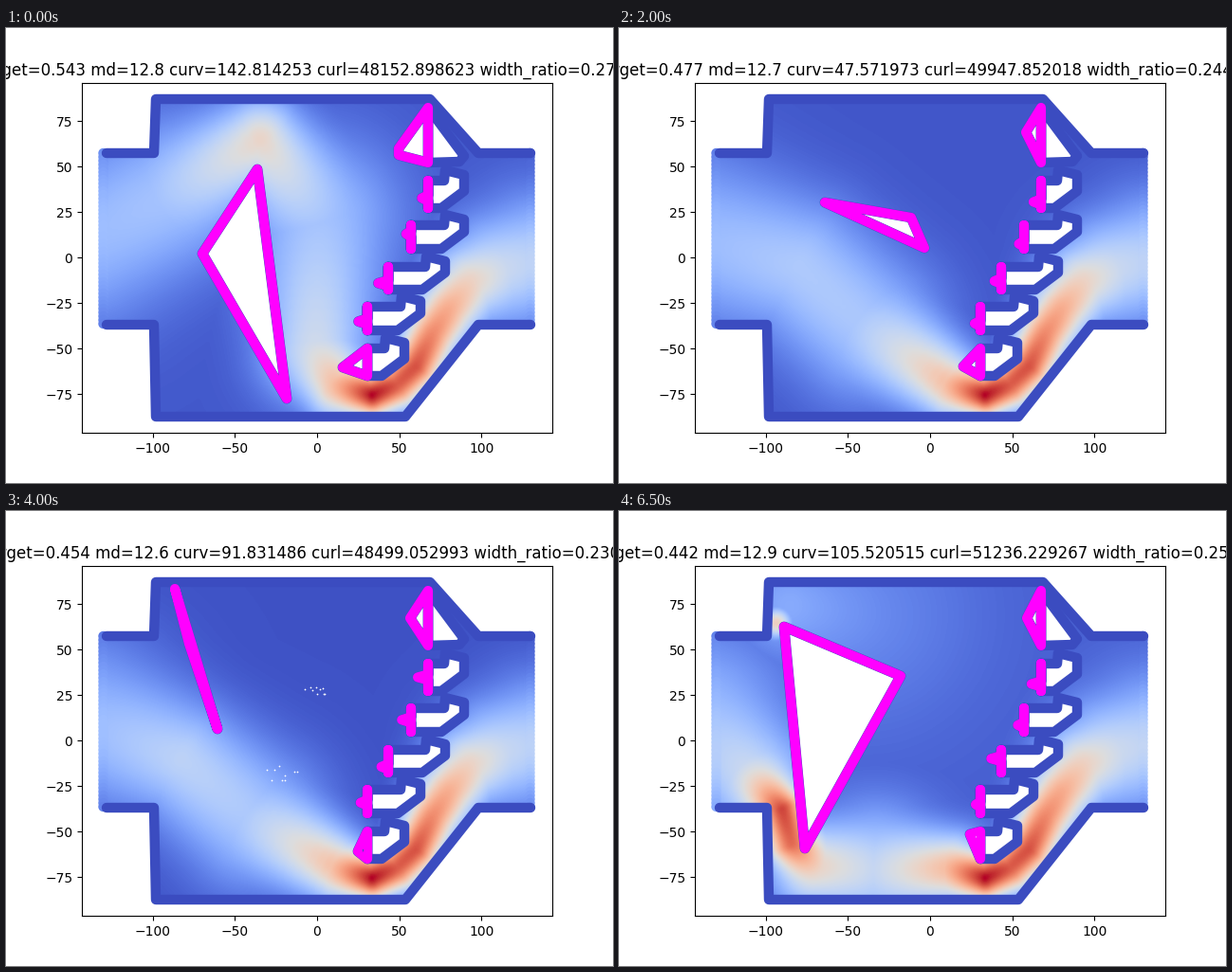
A matplotlib script that plays this animation: 640 px wide and 480 px high, repeating every 7000 ms.

```python
import numpy as np
import matplotlib.pyplot as plt
from matplotlib.animation import FuncAnimation
from matplotlib.collections import LineCollection, PolyCollection
from matplotlib.patches import Polygon

plt.rcParams["text.kerning_factor"] = 6

W, H = 640, 480
STEPS = 14
DARK = plt.get_cmap("coolwarm")(0.0)
PINK = "#ff00ff"
DOT = 7.5  # stroke width of every outline, in points

# Shapes are laid out in stage pixels.
TOP_WALL = [(106, 132), (156, 132), (158, 75), (447, 75), (498, 132), (553, 132)]
LOW_WALL = [(106, 313), (156, 313), (158, 410), (421, 410), (498, 313), (553, 313)]
DOMAIN = [(102, 132), *TOP_WALL[1:], *LOW_WALL[:0:-1], (102, 313)]

# upright side of each tip (x, top, bottom) and right end of the vane behind it
BARS = [(445, 84, 142), (445, 161, 190), (427, 208, 233),
        (403, 252, 276), (381, 294, 319), (381, 338, 367)]
REACH = [483, 483, 483, 463, 437, 420]

# route points: x, y, speed
INLET = (85, 222, .27)
JET = [(350, 377, .65), (386, 387, 1), (412, 376, .88), (432, 357, .9), (450, 322, .78),
       (467, 296, .69), (490, 268, .55), (520, 255, .42), (560, 245, .36)]


def scene(body, head, foot, via, floor=.015, extra=(), gaps=()):
    """Large body, apexes of the first and last tip, and the way the flow takes."""
    return dict(body=body, head=head, foot=foot, floor=floor, gaps=gaps,
                flow=[(24, [INLET, *via, *JET]), *extra])


def split(head, foot):
    return scene([(174, 122), (297, 174), (196, 356)], head, foot,
                 [(140, 280, .42), (172, 315, .92), (182, 350, .85),
                  (205, 374, .55), (270, 378, .37)], .045,
                 extra=[(9, [(166, 118, .56)]), (12, [(180, 100, .2), (260, 110, .1)])])


SCENES = [
    scene([(265, 149), (207, 238), (296, 391)], [(414, 127), (414, 134)], (355, 358),
          [(170, 178, .3), (268, 118, .54), (330, 200, .29), (326, 340, .44)], .03),
    scene([(169, 107), (219, 186), (223, 252), (186, 246)], [(421, 108), (431, 140)],
          (363, 357), [(168, 282, .55), (220, 320, .36), (280, 350, .34)],
          gaps=[(312, 180)]),
    split([(430, 104), (415, 91), (417, 123)], (353, 351)),
    scene([(217, 184), (308, 200), (322, 232)], [(429, 110)], (363, 357),
          [(190, 252, .33), (260, 315, .32)], .025),
    scene([(178, 82), (193, 140), (223, 230)], [(426, 113)], (371, 359),
          [(185, 262, .38), (260, 325, .33)], gaps=[(328, 187), (295, 278)]),
    scene([(305, 119), (376, 140), (321, 221)], [(423, 92), (428, 103)], (364, 347),
          [(175, 235, .28), (245, 290, .27)], gaps=[(187, 226), (250, 302)]),
    split([(430, 113)], (370, 341)),
]

# step at which each scene is reached, and the readings there
KEYS = [0, 1, 3, 6, 8, 10, 13]
READINGS = np.array([
    (.543, 12.8, 142.814253, 48152.898623, .270913),
    (.5, 12.1, 192.371622, 48401.395132, .229418),
    (.481, 12.7, 56.505071, 50668.005549, .251360),
    (.469, 12.7, 29.705778, 48507.544956, .229541),
    (.454, 12.6, 91.831486, 48499.052993, .230625),
    (.453, 12.3, 46.411843, 48539.258104, .224739),
    (.442, 12.9, 105.520515, 51236.229267, .252871),
])

GX, GY = np.meshgrid(np.arange(97, 559, 2.0), np.arange(69, 417, 2.0))


def flow_field(s):
    """Strongest of many soft spots along each route; slow flow spreads wide."""
    out = np.zeros_like(GX)
    for gauge, route in s["flow"]:
        pts = np.array(route, float)
        t = np.linspace(0, len(pts) - 1, 12 * (len(pts) - 1) + 1)
        for x, y, v in zip(*(np.interp(t, np.arange(len(pts)), c) for c in pts.T)):
            d2 = (GX - x) ** 2 + (GY - y) ** 2
            np.maximum(out, v * np.exp(-d2 * (v / gauge) ** 2), out=out)
    return s["floor"] + (1 - s["floor"]) * out


def vane(bar, end):
    x, top, low = bar
    return [(x, low), (end - 24, low), (end, low - 18), (end, top - 6),
            (end - 20, top - 11), (end - 21, top), (x, top)]


def tip(bar, apexes):
    return [(bar[0], bar[1]), *apexes, (bar[0], bar[2])]


def nub(bar, rng):
    """Upright bar with a short spike at a random height."""
    x, top, low = bar
    y = top + (low - top) * rng.uniform(.35, .8)
    return tip(bar, [(x, y - 3), (x - rng.uniform(5, 11), y), (x, y + 3)])


def tips(s, rng):
    return [tip(BARS[0], s["head"]), *(nub(b, rng) for b in BARS[1:-1]),
            tip(BARS[-1], [s["foot"]])]


def heading(i):
    target, md, curv, curl, ratio = (np.interp(i, KEYS, c) for c in READINGS.T)
    return (f"target={float(round(target, 3))} md={md:.1f} curv={curv:.6f} "
            f"curl={curl:.6f} width_ratio={ratio:.6f}")


FIELDS = [flow_field(s) for s in SCENES]

fig = plt.figure(figsize=(W / 100, H / 100), dpi=100, facecolor="white")
stage = fig.add_axes([0, 0, 1, 1])
stage.axis("off")

image = stage.imshow(FIELDS[0], cmap="coolwarm", vmin=0, vmax=1, aspect="auto",
                     extent=(96, 558, 416, 68), interpolation="bilinear", zorder=1)
stage.set_xlim(0, W)
stage.set_ylim(H, 0)
image.set_clip_path(Polygon(DOMAIN, transform=stage.transData))

# columns of dots that round off the open ends
end_x, end_y = (a.ravel() for a in np.meshgrid([102.5, 552.5], np.arange(132, 314, 4.0)))
end_cells = ((end_y - 69) / 2).astype(int), ((end_x - 97) / 2).astype(int)
ends = stage.scatter(end_x, end_y, c=np.zeros(len(end_x)), cmap="coolwarm",
                     vmin=0, vmax=1, s=DOT ** 2, linewidths=0, zorder=2)
specks = stage.scatter([], [], s=1.6, c="white", linewidths=0, zorder=3)


def poly_layer(shapes, face, edge, width, z):
    layer = PolyCollection(shapes, facecolors=face, edgecolors=[edge], linewidths=width,
                           joinstyle="round", capstyle="round", zorder=z)
    stage.add_collection(layer, autolim=False)
    return layer


stage.add_collection(LineCollection([TOP_WALL, LOW_WALL], colors=[DARK], linewidths=DOT,
                                    capstyle="round", joinstyle="round", zorder=4),
                     autolim=False)
first_vane = [(445, 84), (483, 135), (478, 141), (445, 142)]
poly_layer([first_vane, *map(vane, BARS[1:], REACH[1:])], "white", DARK, DOT, 5)
back = poly_layer([], "white", DARK, DOT + .3, 6)
front = poly_layer([], "none", PINK, DOT - .2, 7)

plot = fig.add_axes([0.125, 0.11, 0.775, 0.77], facecolor="none")
plot.set_xlim(-143, 143)
plot.set_ylim(-96.2, 96.2)
title = plot.set_title("")


def update(i):
    k = int(np.searchsorted(KEYS, i))
    s, rng = SCENES[k], np.random.default_rng(i)
    image.set_data(FIELDS[k])
    ends.set_array(FIELDS[k][end_cells])
    shapes = [s["body"], *tips(s, rng)]
    back.set_verts(shapes)
    front.set_verts(shapes)
    spots = [rng.normal(c, (8, 4), (9, 2)) for c in s["gaps"]]
    specks.set_offsets(np.concatenate(spots) if spots else np.empty((0, 2)))
    title.set_text(heading(i))
    return image, ends, back, front, specks, title


anim = FuncAnimation(fig, update, frames=STEPS, interval=500, repeat=True,
                     repeat_delay=0, blit=False)
plt.show()
```
